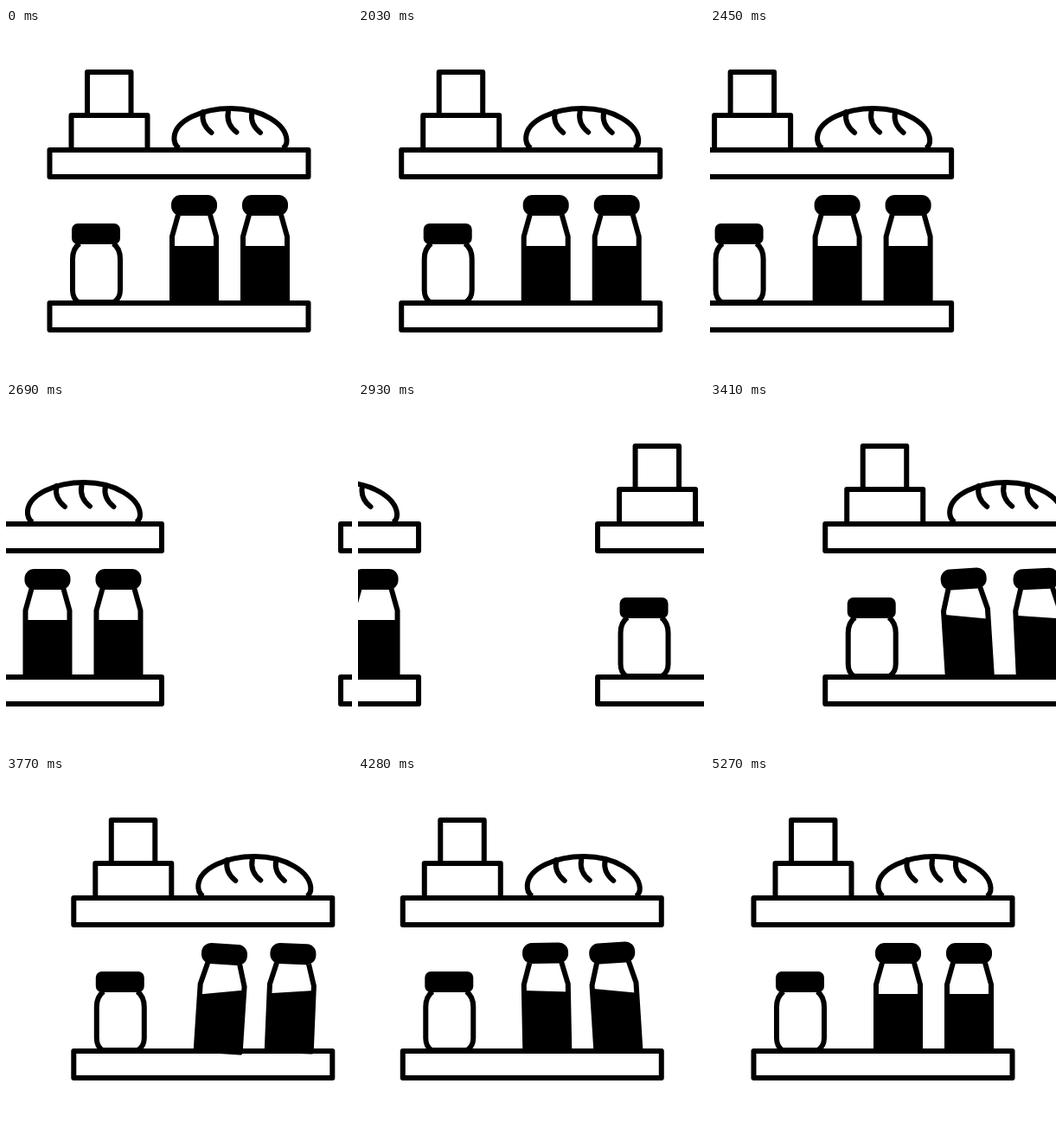
An HTML page for the animation above (5.33 s loop, 400x400 px).

```html
<!DOCTYPE html>
<html lang="en">
<head>
<meta charset="utf-8">
<title>Pantry shelves</title>
<style>
  html, body { margin: 0; width: 100%; height: 100%; overflow: hidden; background: #fff; }
  svg { display: block; width: 100%; height: 100%; }
</style>
</head>
<body>
<svg viewBox="0 0 400 400" fill="none" stroke="#000" stroke-width="6" stroke-linejoin="round">
  <defs>
    <g id="glass">
      <path d="M199 216L192 241V317H243V241L236 216"/>
      <rect x="191" y="193" width="53" height="24" rx="11" fill="#000" stroke="none"/>
    </g>
    <rect id="shelf" x="50.5" y="141" width="299" height="31"/>
    <path id="cut" stroke-linecap="round" d="M0 0Q-3 14 9.500 24"/>
  </defs>
  <g id="strip">
    <g id="unit">
      <rect x="94" y="51" width="50.5" height="50"/>
      <rect x="75.5" y="101" width="88" height="40"/>
      <path d="M200 139C196 136 194 131 194.500 126C196 107 226 93 260 93C296 93 323 111 324.500 129Q325 136 320 139"/>
      <use href="#cut" x="228" y="97"/>
      <use href="#cut" x="257" y="96.500"/>
      <use href="#cut" x="284.500" y="97"/>
      <path d="M85 249Q77 255 77 267V303Q77 313 84 317H125Q132 312 132 303V267Q132 255 124 249"/>
      <rect x="76" y="226" width="56" height="24" rx="7" fill="#000" stroke="none"/>
      <g class="bottle"><use href="#glass"/><path class="milk" fill="#000" stroke="none"/></g>
      <g transform="translate(82)">
        <g class="bottle"><use href="#glass"/><path class="milk" fill="#000" stroke="none"/></g>
      </g>
      <use href="#shelf"/>
      <use href="#shelf" y="177"/>
    </g>
    <use href="#unit" x="506"/>
  </g>
</svg>
<script>
const LOOP = 5330, GAP = 506;
const strip = document.getElementById('strip');
const bottles = [...document.querySelectorAll('.bottle')];

const clamp = v => Math.min(1, Math.max(0, v));

// Speeds up until 2690 ms, then brakes gently
function slide(t) {
  return t < 2690
    ? 169 * clamp((t - 2000) / 690) ** 2.06
    : GAP - 337 * clamp((4543 - t) / 1853) ** 2.85;
}

// The second bottle rocks a little later than the first
function rock(bottle, i, t) {
  const age = t - 3193 - 120 * i;
  const force = clamp(age / 100) * clamp((5240 - t) / 950) ** 2;
  const angle = -3.75 * force * Math.sin(2 * Math.PI * age / 750);
  const level = 252 - 3 * force, slosh = -1.15 * angle;
  bottle.setAttribute('transform', `rotate(${angle} 205 316)`);
  bottle.querySelector('.milk').setAttribute('d',
    `M191 ${level - slosh}L244 ${level + slosh}V317H191Z`);
}

function draw() {
  const t = performance.now() % LOOP;
  strip.setAttribute('transform', `translate(${-slide(t)})`);
  bottles.forEach((bottle, i) => rock(bottle, i, t));
  requestAnimationFrame(draw);
}
draw();
</script>
</body>
</html>
```
